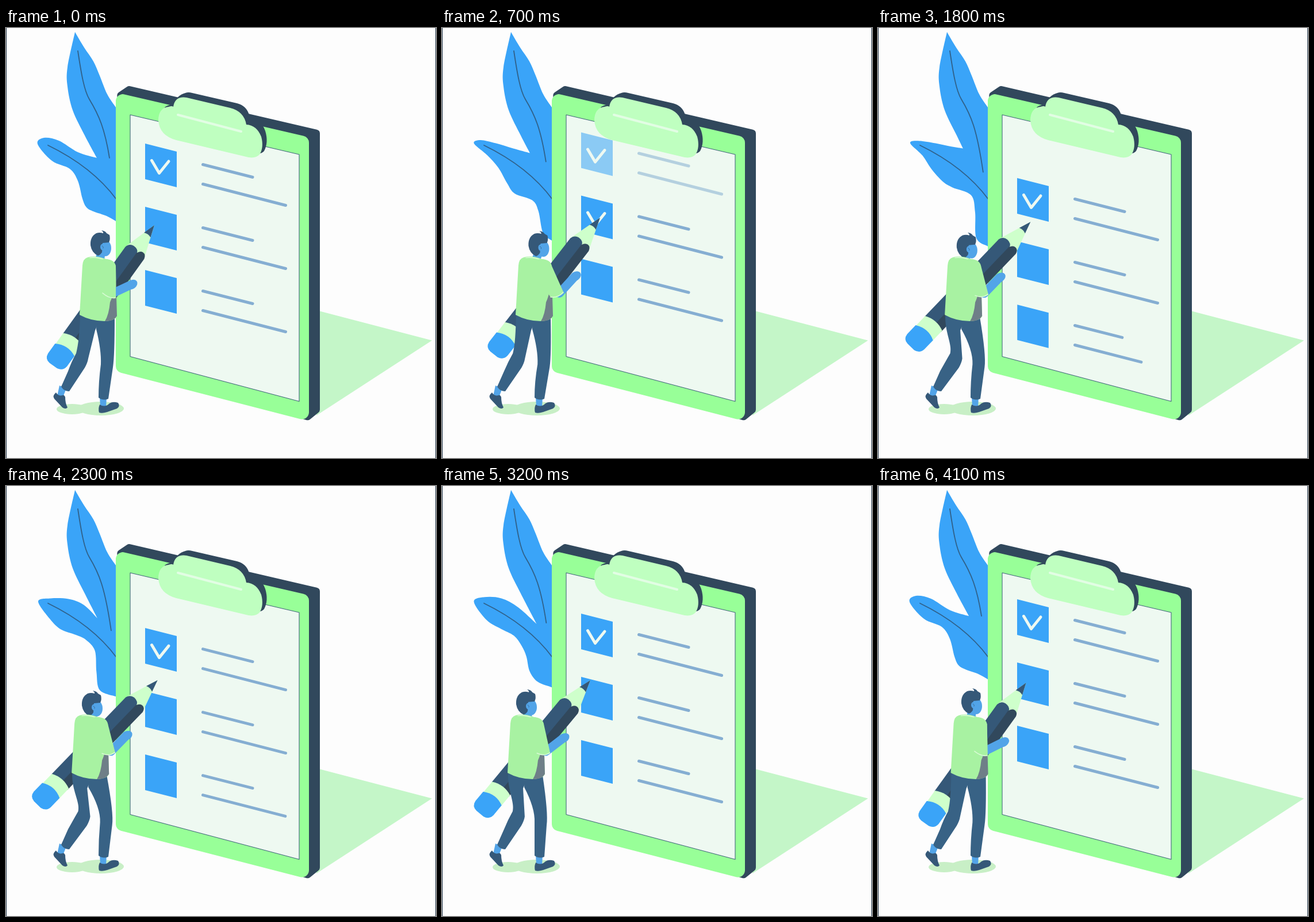
Animation, 748 px wide and 748 px high, one loop 4200 ms. Source, as an HTML page with a canvas:

```html
<!DOCTYPE html>
<html lang="en">
<head>
<meta charset="utf-8">
<title>Checklist</title>
<style>
html, body { margin: 0; width: 100%; height: 100%; overflow: hidden; background: #fdfdfd; }
canvas { display: block; width: 748px; height: 748px; }
</style>
</head>
<body>
<canvas id="stage" width="748" height="748"></canvas>
<script>
const ctx = document.getElementById('stage').getContext('2d');
const LOOP = 4200, STEP = 100;
const C = {
  blue: '#3aa4f8', skin: '#52a4e8', navy: '#355878', dark: '#31485c',
  jeans: '#386285', green: '#98ff98', pale: '#bfffc0', mint: '#ceffcb',
  sweater: '#a8f2a2', cuff: '#d8fbd4', paper: '#eef9f1', line: '#85aed2', vein: '#30618a'
};

const clamp = v => Math.max(0, Math.min(1, v));
const part = (t, start, length) => clamp((t - start) / length);
const easeIn = p => p;
const easeSwing = p => (1 - Math.cos(Math.PI * p)) / 2;
const easeSine = p => Math.sin(Math.PI * p / 2);
const easeOut = p => 1 - (1 - p) ** 3;
const turn = t => 2 * Math.PI * t / LOOP;
const dip = t => (1 - Math.cos(turn(t))) / 2;

// Interpolates lists of points, one list per time; the last time closes the loop.
function mix(times, poses, t, ease = easeIn) {
  let i = times.length - 1;
  while (times[i] > t) i--;
  const next = poses[(i + 1) % poses.length];
  const p = ease(part(t, times[i], (times[i + 1] || LOOP) - times[i]));
  return poses[i].map((pt, k) => pt.map((v, n) => v + (next[k][n] - v) * p));
}

// Continues a path smoothly through all points.
function smooth(path, pts) {
  for (let i = 0; i < pts.length - 1; i++) {
    const b = pts[i], c = pts[i + 1], a = pts[i - 1] || b, d = pts[i + 2] || c;
    path.bezierCurveTo(
      b[0] + (c[0] - a[0]) / 6, b[1] + (c[1] - a[1]) / 6,
      c[0] - (d[0] - b[0]) / 6, c[1] - (d[1] - b[1]) / 6, c[0], c[1]);
  }
}

function fill(shape, color) {
  ctx.fillStyle = color;
  ctx.fill(typeof shape === 'string' ? new Path2D(shape) : shape);
}

function stroke(d, color, width) {
  ctx.strokeStyle = color;
  ctx.lineWidth = width;
  ctx.stroke(new Path2D(d));
}

function ellipse(x, y, rx, ry, color, angle = 0) {
  const path = new Path2D();
  path.ellipse(x, y, rx, ry, angle, 0, Math.PI * 2);
  fill(path, color);
}

function rounded(pts, r) {
  const path = new Path2D(), n = pts.length, a = pts[0], z = pts[n - 1];
  path.moveTo((a[0] + z[0]) / 2, (a[1] + z[1]) / 2);
  pts.forEach((p, i) => path.arcTo(...p, ...pts[(i + 1) % n], r));
  path.closePath();
  return path;
}

// The leaves swing between three poses.
const SWING = [0, 1550, 2800];
const FORK = [[[158, 226]], [[146, 206]], [[166, 243]]];
const SHORT_LEAF = [
  [[125, 216], [92, 196], [66, 191], [55, 202], [80, 231], [111, 245],
    [125, 266], [133, 297], [140, 312], [152, 319], [175, 327], [191, 336]],
  [[123, 206], [95, 203], [68, 197], [56, 200], [78, 216], [91, 242],
    [107, 272], [123, 283], [166, 293], [176, 318], [176, 372], [191, 388]],
  [[138, 207], [112, 195], [80, 195], [56, 201], [76, 235], [96, 251],
    [125, 256], [143, 264], [152, 285], [153, 325], [160, 351], [191, 361]]
];

function leaves(t) {
  const [fork] = mix(SWING, FORK, t, easeSwing);
  const short = mix(SWING, SHORT_LEAF, t, easeSine);
  const path = new Path2D('M120 7');
  smooth(path, [[120, 7], [107, 68], [107, 102], [116, 143], [137, 187], fork]);
  smooth(path, [fork, ...short]);
  path.lineTo(205, short[11][1]);
  path.lineTo(205, 160);
  path.lineTo(191, 138);
  smooth(path, [[191, 138], [176, 115], [163, 83], [152, 58], [136, 34], [120, 7]]);
  fill(path, C.blue);
  stroke(`M125 40C131 80 136 109 145 124C162 152 172 176 ${180 + 3 * dip(t)} ${226 + 26 * dip(t)}`, C.vein, 1.8);
  stroke('M73 204C112 223 158 252 192 298', C.vein, 1.8);
}

function board() {
  fill('M540 491L741 543.5L540 674Z', '#c4f6c8');
  fill(rounded([[193, 114], [213, 100.5], [546, 178], [546, 667], [526, 683], [230, 590]], 7), C.dark);
  fill(rounded([[191, 112], [527, 190], [527, 684], [191, 597.5]], 12), C.green);
  const sheet = 'M216 151L510 220V649.5L216 571.5Z';
  fill(sheet, C.paper);
  stroke(sheet, '#44697c', 1.1);
}

function clip() {
  fill('M276 138Q283 133 290 134Q297 117 312 113Q317 111 324 113L402 131Q418 135 423 151' +
    'Q444 159 451 179Q457 199 449 214Q446 218 438 219L300 180Z', C.dark);
  fill('M265 161Q265 139 283 137Q289 135 291 137Q294 118 314 121L390 139Q414 145 418 168' +
    'Q436 169 444 189Q449 208 441 220Q435 227 422 225L296 195Q267 187 265 161Z', C.pale);
  stroke('M299 151L409 180', '#e2fde4', 4);
}

function row(y, { alpha = 1, box = 1, short = 1, long = 1, check = 0 }) {
  ctx.save();
  ctx.globalAlpha = alpha;
  ctx.translate(0, y);
  if (box > 0) {
    ctx.save();
    ctx.translate(269.5, 38);
    ctx.scale(box, box);
    fill('M-27.5 -38L27.5 -24V38L-27.5 24Z', C.blue);
    ctx.restore();
  }
  if (short > 0) stroke(`M342.5 36.5l${86.5 * short} ${22 * short}`, C.line, 5);
  if (long > 0) stroke(`M342.5 70.5l${144 * long} ${37 * long}`, C.line, 5);
  if (check > 0) {
    const a = clamp(check * 2), b = clamp(check * 2 - 1);
    ctx.globalAlpha = 1;
    stroke(`M253.5 29.5l${13 * a} ${22 * a}l${16.5 * b} ${-20.5 * b}`, C.paper, 5);
  }
  ctx.restore();
}

function list(t) {
  const y = 311 - 0.0278 * t;
  const alpha = 1 - part(t, 400, 660);
  if (alpha > 0) row(y - 110, { alpha, check: 1 });
  row(y, { check: part(t, 200, 400) });
  row(y + 110, {});
  row(y + 220, {
    box: easeOut(part(t, 880, 1150)),
    short: easeOut(part(t, 910, 1400)),
    long: easeOut(part(t, 1300, 1200))
  });
}

// The pencil tip traces the check mark, then drifts back.
const TIP_TIMES = [0, 200, 400, 600, 700, 1300, 2800, 3500];
const TIP = [[258, 343], [254, 335], [267, 351], [283, 325], [275, 330], [267, 337], [262, 338], [255, 338]];

function pencilPose(t) {
  const [[x, y]] = mix(TIP_TIMES, TIP.map(p => [p]), t);
  return { x, y, tilt: (35.7 + 8.5 * dip(t)) * Math.PI / 180 };
}

// Drawn with the tip at the origin and the shaft pointing down.
function pencil({ x, y, tilt }) {
  ctx.save();
  ctx.translate(x, y);
  ctx.rotate(tilt);
  fill('M0 0L-18 56V66H19V56Z', C.mint);
  fill('M0 0L-7 21Q0 18 7 21Z', C.navy);
  fill('M-19 246V60Q-17 51 -8 50Q2 50 4 57V246Z', C.navy);
  fill('M3 246V58Q6 50 12 50Q18 50 20 58V246Z', C.dark);
  fill('M-19 245Q0 235 20 243V272H-19Z', C.mint);
  fill('M-20 268Q0 256 20 266V288Q19 299 8 301H-8Q-19 300 -20 289Z', C.blue);
  ctx.restore();
}

function legs(hip, bend) {
  const x = v => v + hip, l = v => v + hip * 0.1 + bend, r = v => v + hip * 0.45 + bend;
  ellipse(115, 663, 27, 9, '#c8efc6');
  ellipse(165, 662, 40, 12, '#c8efc6');
  fill('M93 622L89 640L99 642L105 627Z', C.skin);
  fill('M163 642L164 658L174 660L175 642Z', C.skin);
  fill('M87 634Q80 640 84 645L98 660Q104 664 107 660Q103 653 103 642Q101 637 98 639Q91 641 87 634Z', C.navy);
  fill('M163 655Q160 662 162 669Q167 671 176 668L193 662Q199 658 195 652Q186 649 180 653Q172 661 163 655Z', C.navy);
  fill(`M${x(158)} 505L${x(157)} 524Q${r(166)} 560 ${r(165)} 585Q161 615 161 643Q169 649 178 645` +
    `L${r(186)} 590Q${r(189)} 570 ${x(189)} 503Z`, C.jeans);
  fill(`M${x(129)} 500C${x(128)} 530 ${l(126)} 550 ${l(122)} 566Q${l(114)} 580 108 597L96 624Q101 632 110 632` +
    `L${l(137)} 591Q${l(142)} 582 ${l(143)} 575L${x(155)} 526L${x(165)} 503Z`, C.jeans);
}

function head(dx, dy, hip) {
  fill(`M${158 + dx} ${386 + dy}L${173 + dx} ${390 + dy}L${171 + hip} 403L${156 + hip} 402Z`, C.skin);
  ctx.save();
  ctx.translate(dx, dy);
  ellipse(173, 383, 10, 14, C.skin);
  fill('M160 396Q149 391 147 378Q146 363 157 357Q163 355 169 357Q170 355 166 352' +
    'Q173 353 175 357L180 360Q182 367 179 373L168 374L167 390Q164 395 160 396Z', C.navy);
  ellipse(168, 381, 4, 5.5, C.skin);
  stroke('M167 379Q170 380 169 383', C.vein, 0.8);
  ctx.restore();
}

function torso(hip) {
  ctx.save();
  ctx.translate(hip, 0);
  fill('M142 399Q134 401 133 413L128 499Q148 510 172 510Q190 509 193 501L192 470L191 414' +
    'Q189 403 174 402Q156 395 142 399Z', C.sweater);
  fill('M191 432L193 501Q188 510 172 510Q179 499 181 477Q188 462 191 432Z', '#6f7f88');
  stroke('M146 399.5Q158 398 172 403', C.cuff, 1.6);
  ctx.restore();
}

// The hand keeps its grip on the pencil and the sleeve follows the reach.
function arm(hip, { x, y, tilt }) {
  const cos = Math.cos(tilt), sin = Math.sin(tilt);
  const hx = x + 28 * cos - 107 * sin, hy = y + 28 * sin + 107 * cos;
  const reach = hx - hip - 218 + 446 - hy;
  const shift = hip + 0.75 * reach;
  const ox = 191 + shift, oy = 470 - 0.33 * reach;
  const ix = 168 + shift, iy = 461 + 0.25 * reach;
  const mx = (ox + ix) / 2, my = (oy + iy) / 2;
  stroke(`M${mx + 4} ${my - 3}L${hx} ${hy}`, C.skin, 15);
  ellipse(hx + 1, hy, 10, 7.5, C.skin, -0.6);
  const cuff = `Q${mx + 1} ${my + 6} ${ix} ${iy}`;
  fill(`M${168 + hip} 402Q${187 + hip} 401 ${191 + hip} 414L${ox} ${oy}${cuff}L${162 + hip} 430Z`, C.sweater);
  stroke(`M${ox - 1} ${oy - 1}${cuff}`, C.cuff, 1.6);
}

function scene(t) {
  const away = 1 - (1 - part(t, 700, 1800)) ** 2;
  const hip = -14 * (away - easeSwing(part(t, 3400, 880)));
  const sink = dip(t), pose = pencilPose(t);
  ctx.lineCap = ctx.lineJoin = 'round';
  ctx.fillStyle = '#fdfdfd';
  ctx.fillRect(0, 0, 748, 748);
  leaves(t);
  board();
  list(t);
  clip();
  pencil(pose);
  legs(hip, 5 * sink);
  head(hip + 4 * Math.sin(turn(t)), 4 * sink, hip);
  torso(hip);
  arm(hip, pose);
  ctx.fillStyle = '#26394d';
  ctx.fillRect(0, 0, 1, 748);
  ctx.fillRect(747, 0, 1, 748);
}

const start = performance.now();
function tick() {
  const t = (performance.now() - start) % LOOP;
  scene(Math.floor(t / STEP) * STEP);
  requestAnimationFrame(tick);
}
tick();
</script>
</body>
</html>
```
